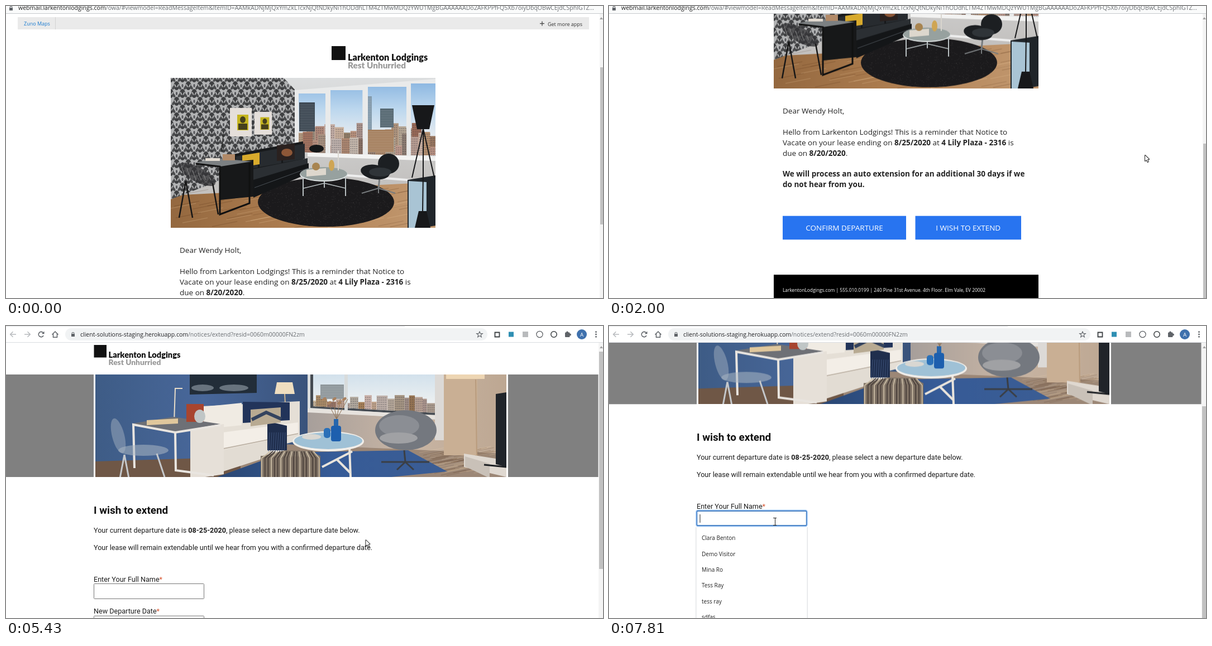
Animation of 1069x524 px, one loop 8 s. Source, as an HTML page with a canvas:

```html
<!DOCTYPE html>
<html lang="en">
<head>
<meta charset="utf-8">
<title>Lease notice</title>
<style>
html, body { margin: 0; width: 100%; height: 100%; overflow: hidden; background: #fff; }
canvas { display: block; }
</style>
</head>
<body>
<canvas id="stage" width="1069" height="524"></canvas>
<script>
const W = 1069, H = 524, LOOP = 8000;
const stage = document.getElementById('stage').getContext('2d');
let g = stage;

const SANS = '"Open Sans", "Noto Sans", sans-serif';
const ROBOTO = 'Roboto, sans-serif';
const LATO = 'Lato, sans-serif';
const INK = '#5f6368';

// ---- drawing helpers ----
const lerp = (a, b, p) => a + (b - a) * p;
function rect(c, x, y, w, h) { g.fillStyle = c; g.fillRect(x, y, w, h); }
function trace(p) {
  g.beginPath();
  for (let i = 0; i < p.length; i += 2) g.lineTo(p[i], p[i + 1]);
}
function poly(c, ...p) { trace(p); g.fillStyle = c; g.fill(); }
function line(c, w, ...p) { trace(p); g.strokeStyle = c; g.lineWidth = w; g.stroke(); }
function oval(c, x, y, rx, ry = rx, tilt = 0) {
  g.beginPath(); g.ellipse(x, y, rx, ry, tilt, 0, 7); g.fillStyle = c; g.fill();
}
function ring(c, w, x, y, r, from = 0, to = 2 * Math.PI) {
  g.beginPath(); g.arc(x, y, r, from, to); g.strokeStyle = c; g.lineWidth = w; g.stroke();
}
function round(c, x, y, w, h, r) { g.beginPath(); g.roundRect(x, y, w, h, r); g.fillStyle = c; g.fill(); }
function frame(c, lw, x, y, w, h, r = 0) {
  g.beginPath(); g.roundRect(x, y, w, h, r); g.strokeStyle = c; g.lineWidth = lw; g.stroke();
}
// face with a sloping upper edge and upright sides
function slab(c, x0, y0, x1, y1, h0, h1 = h0) { poly(c, x0, y0, x1, y1, x1, y1 + h1, x0, y0 + h0); }
// n struts from one joint, feet spread evenly
function struts(c, w, x, y, spread, drop, n) {
  for (let i = 0; i < n; i++) line(c, w, x, y, x + lerp(-spread, spread, i / (n - 1)), y + drop);
}
// tapered lamp shade
function cone(c, x, y, top, bottom, h) {
  poly(c, x - top, y, x + top, y, x + bottom, y + h, x - bottom, y + h);
}
function clipped(paint, ...p) {
  g.save(); trace(p); g.clip(); paint(); g.restore();
}
function text(s, x, y, size, c = '#222', font = SANS, weight = 400, align = 'left') {
  g.font = `${weight} ${size}px ${font}`;
  g.textAlign = align; g.fillStyle = c; g.fillText(s, x, y);
  return x + g.measureText(s).width;
}
// runs on one line, every second one bold
function runs(x, y, size, c, font, ...parts) {
  parts.forEach((s, i) => { x = text(s, x, y, size, c, font, i % 2 ? 700 : 400); });
}
function shade(x0, y0, x1, y1, ...cols) {
  const f = g.createLinearGradient(x0, y0, x1, y1);
  cols.forEach((c, i) => f.addColorStop(i / (cols.length - 1), c));
  return f;
}
function random(seed) { return () => (seed = seed * 16807 % 2147483647) / 2147483647; }

// ---- timing helpers ----
// progress in n equal jumps, the first at a and the last at b
function jumps(t, a, b, n) {
  const k = Math.floor((t - a + 8) / ((b - a) / (n - 1))) + 1;
  return Math.max(0, Math.min(1, k / n));
}
const soft = p => p * p * (3 - 2 * p);

// ---- photos, painted once ----
function photo(x, y, w, h, paint) {
  const c = document.createElement('canvas');
  c.width = w; c.height = h;
  g = c.getContext('2d');
  g.translate(-x, -y);
  paint(x, y, w, h);
  g = stage;
  return c;
}
function skyline(x0, x1, base, low, high, seed) {
  const r = random(seed);
  for (let x = x0; x < x1;) {
    const w = 7 + r() * 13, h = lerp(low, high, r());
    rect(`hsl(${15 + r() * 20} ${10 + r() * 22}% ${45 + r() * 28}%)`, x, base - h, w, h);
    for (let v = base - h + 3; v < base; v += 4)
      for (let u = x + 1.5; u < x + w - 1; u += 3.5) rect('rgba(50,50,60,.4)', u, v, 1.7, 2);
    x += w;
  }
}
function tower(c, x, y, w, h) {
  rect(c, x, y, w, h);
  for (let v = y + 3; v < y + h; v += 3) rect('rgba(255,255,255,.16)', x + 1, v, w - 2, 1);
}
function planks(x0, x1, y0, y1, seed) {
  const r = random(seed);
  for (let i = 0; i < 70; i++) {
    const x = lerp(x0, x1, r()), y = lerp(y0, y1, r());
    line(r() < .5 ? 'rgba(255,225,180,.2)' : 'rgba(70,35,10,.2)', 1.2, x, y, x + 45, y - 9);
  }
}
function fuzz(x, y, rx, ry) {
  const r = random(5);
  for (let i = 0; i < 700; i++) {
    const a = r() * 6.3, d = Math.sqrt(r());
    rect('rgba(95,92,92,.25)', x + rx * d * Math.cos(a), y + ry * d * Math.sin(a), 1.5, 1);
  }
}
function damask(x0, y0, cols, rows) {
  for (let j = 0; j < rows; j++) for (let i = 0; i < cols; i++) {
    const x = x0 + (i + j % 2 / 2) * 21, y = y0 + j * 14;
    oval('#3f4042', x, y, 5, 8);
    for (const d of [-1, 1]) {
      oval('#4b4c4e', x + d * 5, y + 3, 2.4, 4.5, -d * .6);
      oval('#b4b5b6', x + d * 2.4, y, 1, 3.2, d * .5);
    }
    oval('#55565a', x + 10.5, y, 1.5, 3);
  }
}

const blackRoom = photo(295, 129, 474, 269, (x, y, w, h) => {
  rect(shade(0, y, 0, y + 190, '#dcdedf', '#c3c1bf'), x, y, w, h);
  slab(shade(x, 0, x + w, 0, '#94683f', '#b08052', '#c39a72'), x, 340, 769, 316, 90);
  planks(x, 760, 335, 398, 11);
  clipped(() => {
    rect('#b2b3b4', x, y, 240, 220);
    damask(x, y, 12, 16);
  }, x, y, 497, y, 517, 150, 517, 262, x, 347);

  // windows grow and widen toward the viewer
  slab('#e9eaea', 517, 151, 769, 131, 112, 141);
  for (let i = 0; i < 4; i++) {
    const px = 524 + 56 * i + 5 * i * (i - 1) + i, pw = 48 * 1.2 ** i, top = 157 - 6 * i, end = 262 + 2 * i;
    clipped(() => {
      rect(shade(0, 140, 0, 230, '#8fb9e2', '#bcd7ee', '#e3eaf0'), px, top, pw, 140);
      skyline(517, 769, 268, 30, 62, 7);
      tower('#8299aa', 643, 162, 12, 60);
      tower('#566872', 670, 184, 24, 34);
      skyline(517, 769, 268, 14, 44, 23);
      tower('#3c4752', 525, 173, 28, 52);
      tower('#a5805f', 644, 222, 50, 40);
    }, px, top, px + pw, top - 3, px + pw, end + 2, px, end);
  }
  slab('#f3f3f2', 540, 263, 769, 271, 7);
  line('#eee', 4, 600, 303, 769, 316);

  // wall prints
  for (const [px, py, s] of [[401, 183, 1], [445, 190, .8]]) {
    rect('#e5dfda', px, py, 39 * s, 51 * s);
    rect('#c5b51f', px + 13 * s, py + 12 * s, 20 * s, 28 * s);
    oval('#45401c', px + 23 * s, py + 21 * s, 5 * s, 6 * s);
    rect('#45401c', px + 15 * s, py + 28 * s, 16 * s, 11 * s);
  }

  oval('#1b1a1c', 573, 352, 122, 44);
  fuzz(573, 352, 120, 43);

  // sofa
  slab('#17191b', 396, 268, 532, 243, 60, 40);
  for (let i = 0; i < 3; i++) slab('#272b2f', 412 + 42 * i, 270 - 8 * i, 451 + 42 * i, 263 - 8 * i, 27);
  slab('#2b2f33', 441, 293, 540, 273, 22, 10);
  slab('#141618', 443, 312, 542, 282, 32, 18);
  line('#4a5056', 1, 445, 326, 541, 291);
  slab('#d8aa2c', 423, 268, 454, 263, 21);
  slab('#2a211f', 485, 250, 517, 247, 28);
  oval('#8d5737', 503, 263, 10, 7);
  oval('#151719', 556, 256, 13, 7);

  // desk and its chair
  slab('#171819', 384, 282, 443, 276, 66);
  poly('#7c8082', 336, 282, 376, 273, 440, 279, 384, 288);
  line('#111', 3, 340, 283, 383, 288, 383, 374, 436, 354, 436, 281);
  rect('#e4dcd2', 357, 273, 26, 5);
  rect('#b28a68', 388, 266, 22, 11);
  oval('rgba(50,50,52,.75)', 342, 302, 37, 13, .5);
  for (let i = 0; i < 6; i++) line('#8a8a8a', 1, 314 + i * 10, 287 + i * 4, 322 + i * 9, 312);
  struts('#161616', 2.5, 322, 314, 12, 66, 2);
  line('#161616', 2.5, 370, 318, 380, 374);
  line('#222', 1.5, 389, 232, 386, 262);

  // glass table
  for (const px of [532, 570, 608]) line('#b9c0c2', 2, px, 304, px, px === 570 ? 326 : 341);
  line('#b9c0c2', 1.5, 533, 327, 570, 318, 608, 327);
  oval('#dde2e2', 569, 302, 43, 13);
  oval('#97a19f', 569, 301, 42, 12);
  slab('#ddd7cd', 538, 294, 573, 291, 12);
  oval('#a88450', 555, 288, 7);
  oval('#cfa553', 583, 286, 5, 10);
  rect('#d9d5ce', 594, 259, 2, 36);

  // swivel chair
  line('#777b7d', 3, 669, 308, 667, 328);
  struts('#777b7d', 2, 667, 327, 30, 9, 3);
  oval('#1c1f22', 685, 283, 19, 18);
  oval('#1c1f22', 661, 298, 26, 13, .15);
  oval('#2f3438', 670, 298, 20, 8);

  // cabinet and tall lamp
  slab('#20252a', 719, 312, 769, 304, 90);
  slab('#a9c4d4', 721, 314, 753, 316, 84);
  struts('#17181a', 2, 747, 220, 20, 88, 3);
  line('#17181a', 2, 747, 300, 746, 370);
  cone('#17181a', 747, 178, 20, 11, 43);
  cone('#17181a', 746, 368, 7, 14, 30);
});

const blueRoom = photo(160, 48, 736, 184, (x, y, w, h) => {
  rect(shade(x, 0, 545, 0, '#3e5c86', '#48679a', '#39527a'), x, y, w, h);
  rect(shade(540, 0, 896, 0, '#a79f9b', '#c8b5a4', '#bda792'), 540, y, 356, h);
  slab('#9c8776', 380, 168, 896, 190, 70);
  slab('#6f5746', x, 204, 420, 196, 40);
  planks(740, 840, 185, 230, 31);

  slab('#d9dcdd', 540, y, 786, y, 66, 82);
  slab('#454b52', 545, y, 774, y, 60, 74);
  clipped(() => {
    rect(shade(0, 48, 0, 100, '#d2e1ec', '#edf0f1'), 545, y, 230, 80);
    skyline(548, 770, 124, 22, 40, 41);
    tower('#8f979b', 563, 66, 42, 26);
  }, 550, y, 769, y, 769, 117, 550, 105);
  rect('#d8dbdb', 606, y, 6, 64);
  slab('#e6e2dd', 540, 109, 774, 121, 7);
  rect('#dcd9d6', 768, y, 16, 118);
  rect('#c9af94', 784, y, 60, 145);
  rect('#edd5b3', 788, y, 69, 8);
  line('#b89b7d', 2, 841, 57, 843, 195);

  // picture and lamps
  slab('#222d39', 329, y, 449, y, 36, 33);
  for (const [px, r] of [[352, 20], [408, 26]]) oval('rgba(150,162,172,.6)', px, 72, r, 6);
  line('#e8dcc8', 2, 301, 134, 303, 73, 316, 73);
  cone('#efdec0', 499, 62, 14, 18, 21);
  line('#c8b18b', 2, 499, 83, 500, 100);

  poly(shade(380, 0, 790, 0, '#2a4774', '#365b97', '#3b5d94'), 498, 188, 720, 184, 790, 222, 690, 232, 378, 232);

  // sofa with throw and pillow
  slab('#e5dfd6', 330, 106, 526, 96, 110, 70);
  slab('#f0ebe3', 334, 108, 422, 99, 40);
  slab('#f3eee7', 388, 152, 523, 134, 28, 20);
  line('#b9aea1', 1.5, 390, 181, 523, 154);
  slab('#e2dcd3', 386, 185, 500, 160, 38, 26);
  slab('#22345a', 424, 97, 508, 98, 38, 32);
  slab('#1f2e4d', 468, 132, 503, 140, 52, 44);
  for (let i = 0; i < 8; i++) line('#3d5178', 1, 472 + 4 * i, 152, 470 + 4 * i, 186);
  slab('#b8aa92', 438, 111, 492, 107, 30, 27);
  line('#34435e', 6, 440, 129, 466, 116, 493, 128);

  // desk
  slab('#e6e0d8', 330, 146, 390, 137, 90);
  poly('#6e7076', 226, 136, 300, 124, 384, 137, 303, 151);
  line('#e9e5e0', 4, 230, 216, 228, 138, 303, 152, 384, 139);
  line('#e9e5e0', 4, 303, 152, 304, 220, 372, 229);
  slab('#e0c79c', 252, 130, 308, 127, 9);
  rect('#a8452f', 323, 101, 31, 32);
  oval('#c0c6c6', 347, 123, 10, 12);

  // clear chair
  oval('rgba(170,182,196,.45)', 201, 158, 11, 32, -.25);
  oval('rgba(170,182,196,.55)', 246, 184, 45, 10);
  struts('#c5c8cb', 3, 212, 192, 8, 42, 2);
  line('#c5c8cb', 3, 270, 190, 284, 232);

  // striped stool
  slab('#7d7063', 456, 194, 563, 194, 40);
  poly('#85796b', 456, 195, 500, 184, 548, 185, 563, 195);
  for (let i = 0; i < 19; i++) {
    const px = 458 + i * 5.7;
    line(i % 3 ? '#493f3a' : '#cbbda5', 1.8, px, 232, px, 198, lerp(px, 520, .25), 186);
  }

  // glass table and vases
  line('#e9e4dc', 4, 615, 178, 617, 232);
  line('#e9e4dc', 4, 566, 214, 620, 186);
  line('#e9e4dc', 4, 592, 200, 616, 224);
  oval('#f1eee9', 577, 168, 64, 18);
  oval('#9fc1d6', 577, 167, 61, 15);
  oval('#d9d7d2', 547, 160, 17, 5);
  struts('#8f7458', 1, 592, 128, 20, -36, 4);
  for (let i = 0; i < 5; i++) oval('#a98260', 570 + 9 * i, 92 + 7 * (i % 2), 4, 2.5, -.6);
  rect('#2666ad', 587, 128, 8, 16);
  round('#1d5fae', 582, 140, 18, 28, 4);
  round('#2a70b8', 569, 144, 12, 18, 5);

  // armchair
  line('#3b3f45', 3, 713, 184, 715, 205);
  for (const d of [0, 14]) struts('#3b3f45', 3, 715, 205, 43 - 2 * d, d, 2);
  oval('#74787f', 716, 148, 55, 36);
  oval('#8b8e94', 704, 140, 36, 19);
  oval('#a0a1a4', 703, 162, 34, 10);

  // media stand
  slab('#dfd8d0', 820, 190, 896, 202, 24, 30);
  slab('#c9c1b8', 822, 195, 866, 208, 18, 26);
  slab('#20242a', 877, 83, 896, 80, 126, 134);
  line('#1d2024', 3, 856, 210, 896, 214);
});

// ---- shared parts ----
function logo(x, y, k) {
  rect('#111', x, y, 25 * k, 25 * k);
  text('Larkenton Lodgings', x + 29 * k, y + 26 * k, 16.2 * k, '#111', LATO, 900);
  text('Rest Unhurried', x + 29 * k, y + 40 * k, 15.3 * k, '#9a9a9a', LATO, 900);
}
function padlock(x, y) {
  rect(INK, x - 3, y - 1, 6, 5);
  ring(INK, 1.2, x, y - 1.5, 2, Math.PI, 2 * Math.PI);
}
function scrollbar(x, top, y, h) {
  rect('#f4f4f4', x, top, W - x, H - top);
  cone('#a0a0a0', W - 3, top + 6, 0, 3, 4);
  rect('#c1c1c1', x + 1, y, W - x - 1, h);
}
function outlined(x, y, build) {
  g.save(); g.translate(x, y);
  g.beginPath(); build();
  g.strokeStyle = '#222'; g.lineWidth = 2; g.lineJoin = 'round'; g.stroke();
  g.fillStyle = '#fff'; g.fill();
  g.restore();
}
const arrow = (x, y) => outlined(x + 1, y + 2, () => {
  g.lineTo(0, 0); g.lineTo(0, 10); g.lineTo(2.6, 8); g.lineTo(4.5, 12);
  g.lineTo(5.7, 11.4); g.lineTo(4, 7.3); g.lineTo(7, 7); g.closePath();
});
const hand = (x, y) => outlined(x, y, () => {
  g.roundRect(-.3, 1, 2, 11, 1);
  g.roundRect(-.3, 7, 8.6, 9.5, 2.5);
  g.roundRect(-3, 9, 4, 3, 1.5);
});
function beam(x, y) {
  for (const d of [-6.5, 6.5]) line('#222', 1, x - 3, y + d, x + 3, y + d);
  line('#222', 1, x + .5, y - 6.5, x + .5, y + 6.5);
}
const press = (x, y) => oval('rgba(250,215,0,.55)', x, y, 9.5);

// ---- email ----
const MAIL_HOST = 'webmail.larkentonlodgings.com';
const MAIL_PATH = '/owa/#viewmodel=ReadMessageItem&ItemID=AAMkADNjMjQxYmZkLTcxNjQtNDkyNi1hODdhLTM4ZTMwMDQzYWU1MgBGAAAAAADo2AFKPPfFQ5Xb7oiyDbqOBwCEjdCSphIGTZ...';

function button(label, x, w) {
  rect('#2874f0', x, 627, w, 42.5);
  text(label, x + w / 2, 653, 13.5, '#fff', SANS, 400, 'center');
}
function emailBody() {
  const say = (row, ...parts) => runs(311, 443 + 18.95 * row, 13.5, '#222', SANS, ...parts);
  rect('#eaeaea', 21, 20, 1023, 22);
  rect('#d2d2d2', 88, 20, 1, 22);
  text('Zuno Maps', 32, 35, 9, '#1a7bd0');
  line('#444', 1.3, 956, 31.5, 964, 31.5);
  line('#444', 1.3, 960, 27.5, 960, 35.5);
  text('Get more apps', 970, 35.5, 9, '#333');
  logo(583, 72, 1);
  g.drawImage(blackRoom, 295, 129);
  say(0, 'Dear Wendy Holt,');
  say(2, 'Hello from Larkenton Lodgings! This is a reminder that Notice to');
  say(3, 'Vacate on your lease ending on ', '8/25/2020', ' at ', '4 Lily Plaza - 2316', ' is');
  say(4, 'due on ', '8/20/2020', '.');
  say(6, '', 'We will process an auto extension for an additional 30 days if we');
  say(7, '', 'do not hear from you.');
  button('CONFIRM DEPARTURE', 311, 221);
  button('I WISH TO EXTEND', 548.5, 189.5);
  rect('#000', 295, 732.5, 474, 120);
  text('LarkentonLodgings.com | 555.010.0199 | 240 Pine 31st Avenue. 4th Floor. Elm Vale, EV 20002', 311, 763, 8.35, '#fff');
}
function email(t) {
  const wheel = 1 - (1 - jumps(t, 1050, 1540, 7)) ** 1.39;
  const s = 237 * wheel + 13.3 * soft(jumps(t, 1850, 2000, 3));
  g.save();
  g.translate(0, -s);
  emailBody();
  g.restore();
  scrollbar(1063, 14, 110 + .547 * s, 282);
  rect('#fafbfb', 0, 0, W, 13);
  rect('#c6c9cc', 0, 13, W, 1);
  padlock(9, 4);
  text(MAIL_PATH, text(MAIL_HOST, 22, 7, 10.55), 7, 10.55, '#6b6f73');

  const enter = jumps(t, 70, 430, 6);
  if (!enter) return;
  const e = Math.sin((enter - 1 / 6) * 1.2 * Math.PI / 2), m = soft(jumps(t, 2630, 3090, 7));
  const x = lerp(lerp(997, 959, e), 636, m), y = lerp(lerp(508, 266, e), 392, m);
  if (t >= 422 && t < 580 || t >= 3620) press(x - .5, y);
  (m && x < 738 && y > 376 ? hand : arrow)(x, y);
}

// ---- browser bar ----
function browser(t) {
  const ready = t >= 4790;
  rect('#fff', 0, 0, W, 29);
  rect('#e4e6e8', 0, 0, 714, 1);
  rect('#dadce0', 0, 29, W, 1);
  for (const [x, d] of [[13, -1], [38, 1]]) {
    line('#b6b9bc', 1.5, x - 5, 15, x + 5, 15);
    line('#b6b9bc', 1.5, x + d * .5, 10.2, x + d * 5.3, 15, x + d * .5, 19.8);
  }
  if (t < 4960) {
    for (const d of [-4.5, 4.5]) line(INK, 1.7, 63 - d, 10.5, 63 + d, 19.5);
  } else {
    ring(INK, 1.6, 63, 15, 4.6, .5, 5.5);
    poly(INK, 68.5, 9.5, 68.5, 14.3, 63.8, 14.3);
  }
  line(INK, 1.5, 82.5, 15.5, 88, 10, 93.5, 15.5);
  line(INK, 1.5, 84.5, 14, 84.5, 20.3, 91.5, 20.3, 91.5, 14);
  round('#f1f3f4', 106, 4, 756, 22, 11);
  if (t >= 4002) {
    if (ready) padlock(120, 15);
    else { ring(INK, 1, 120, 15, 4); rect(INK, 119.5, 14, 1, 3.3); }
    const end = text('client-solutions-staging.herokuapp.com', 133, 18.7, 10.5, '#202124');
    text('/notices/extend?resid=0060m00000FN2zm', end, 18.7, 10.5, ready ? '#6a6e72' : '#202124');
  }
  const star = [];
  for (let i = 0; i <= 10; i++) {
    const r = i % 2 ? 2.3 : 5.6, a = i * Math.PI / 5;
    star.push(848 + r * Math.sin(a), 15.3 - r * Math.cos(a));
  }
  line(INK, 1.1, ...star);
  frame('#3c4043', 1.8, 875.5, 11.5, 8, 8);
  rect('#2f8fb3', 900, 10.5, 9, 9);
  rect('#b9bbbd', 925, 10, 10, 10);
  ring(ready ? '#55585c' : '#aeb1b4', 1.2, 955.5, 15, 5.6);
  ring('#3c4043', 1.5, 981, 15, 5.2);
  round(INK, 1001, 11.5, 8.5, 8.5, 1);
  oval(INK, 1005, 11.5, 1.9);
  oval(INK, 1010, 15.5, 1.9);
  oval('#3f71ad', 1031, 15, 9);
  text('A', 1031, 18.5, 9.5, '#fff', ROBOTO, 400, 'center');
  for (const d of [-4.3, 0, 4.3]) oval(INK, 1056.5, 15 + d, 1.4);
}

// ---- extension form ----
function field(label, y, border) {
  text('*', text(label, 157, y, 12.6, '#1c1c1c', ROBOTO), y, 12.6, '#d8552f', ROBOTO);
  frame(border, 1, 157.5, y + 4, 197, 27, 1);
}
function formBody(t) {
  const say = (y, ...parts) => runs(157, y, 12.6, '#1c1c1c', ROBOTO, ...parts);
  logo(157.5, 34, .9);
  rect('#808080', 0, 87, 157, 184);
  rect('#808080', 899, 87, 161.5, 184);
  if (t >= 5022) g.drawImage(blueRoom, 160, 87);
  text('I wish to extend', 157, 336.5, 18.9, '#111', ROBOTO, 700);
  say(370.5, 'Your current departure date is ', '08-25-2020', ', please select a new departure date below.');
  say(402, 'Your lease will remain extendable until we hear from you with a confirmed departure date.');
  field('Enter Your Full Name', 458.5, t >= 7322 ? '#444' : '#767676');
  field('New Departure Date', 516.3, '#767676');
  text('mm/dd/yyyy', 163, 538, 13.2, '#333', ROBOTO);
  frame('#222', 1.4, 334.5, 529, 10, 10.5);
  rect('#222', 334, 528, 11, 3.5);
}
function suggestions(t) {
  const p = jumps(t, 7640, 7810, 3);
  if (!p) return;
  frame('#a9cdf7', 3, 156.5, 331, 198, 28, 3);
  frame('#2b6cb8', 1.3, 157.5, 332, 196, 26, 1);
  rect('#222', 162.5, 338, 1, 15);
  if (p < .5) return press(297, 351);
  g.save();
  g.globalAlpha = p;
  rect('#e3e5e7', 155, 361, 201, 170);
  rect('#fff', 156.5, 361, 198, 170);
  ['Clara Benton', 'Demo Visitor', 'Mina Ro', 'Tess Ray', 'tess ray', 'sdfas']
    .forEach((s, i) => text(s, 166, 384.2 + i * 28.4, 10));
  g.restore();
}
function form(t) {
  if (t >= 4952) {
    const s = 130.7 * jumps(t, 6000, 6240, 4) ** 1.746;
    g.save();
    g.translate(0, -s);
    formBody(t);
    g.restore();
    scrollbar(1061, 30, 46 + .75 * s, 390);
  }
  browser(t);
  suggestions(t);
  const a = jumps(t, 5430, 5740, 5), b = soft(jumps(t, 6790, 7330, 8));
  const x = lerp(lerp(636, 673, a), 297, b);
  const y = lerp(lerp(391, 386, a) - 13 * Math.sin(Math.PI * a), 351, b) + 38 * Math.sin(Math.PI * b);
  (x < 354 && y < 359 ? beam : arrow)(x, y);
}

const start = performance.now();
function tick() {
  const t = (performance.now() - start) % LOOP;
  rect('#fff', 0, 0, W, H);
  (t < 3930 ? email : form)(t);
  requestAnimationFrame(tick);
}
tick();
</script>
</body>
</html>
```
